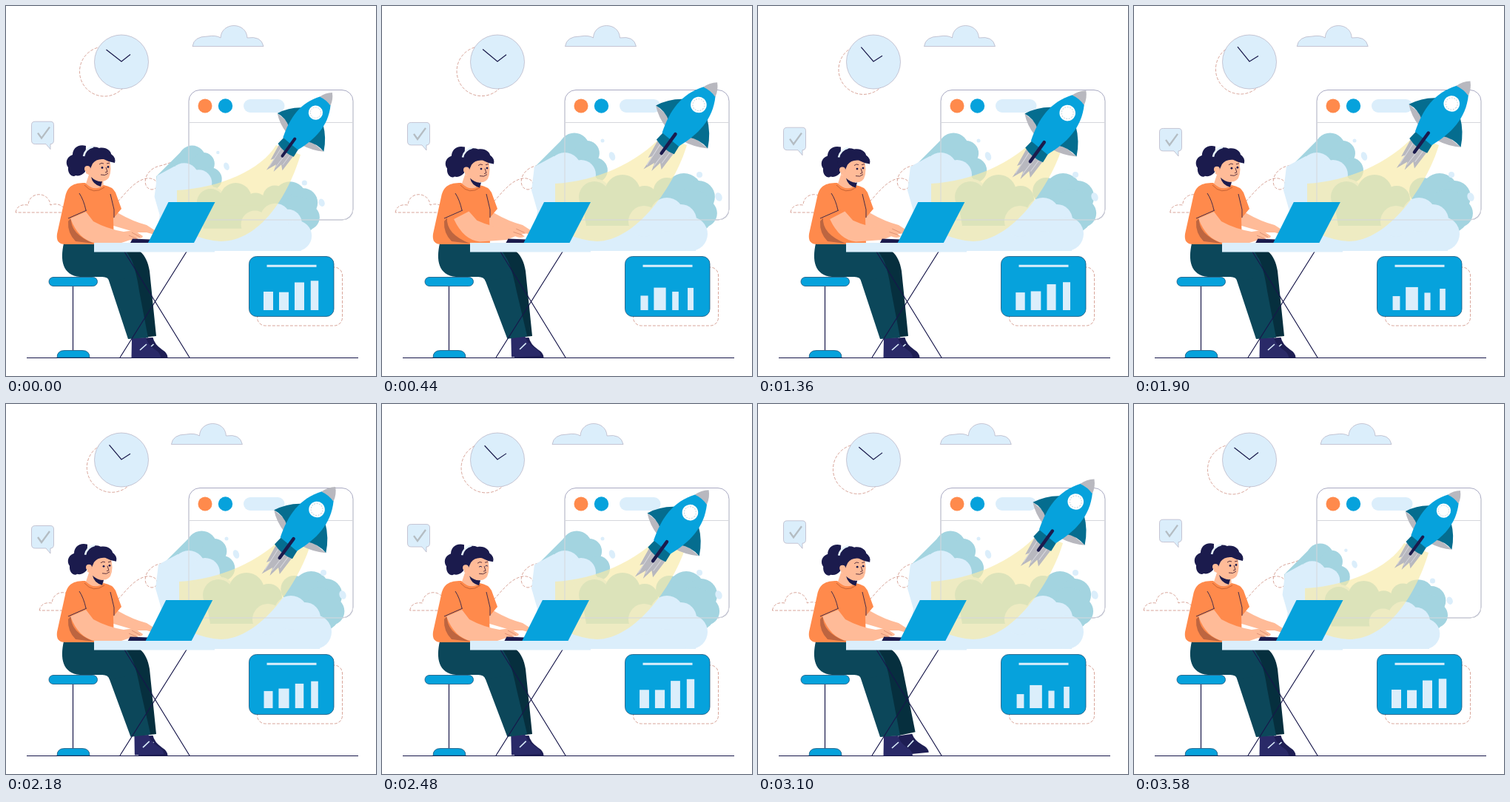
These frames come from a looping animation (500x500 px, 3600 ms). An HTML page:

```html
<!DOCTYPE html>
<html lang="en">
<head>
<meta charset="utf-8">
<title>Rocket launch at the desk</title>
<style>
html, body { margin: 0; width: 100%; height: 100%; overflow: hidden; background: #fff; }
svg { display: block; width: 500px; height: 500px; }
.dash { fill: none; stroke: #cf8f80; stroke-width: .8; stroke-dasharray: 4 2; }
.line { fill: none; stroke: #17174a; stroke-width: 1.2; }
.edge { stroke: #a9a3b8; stroke-width: .6; }
.light { fill: #dbeefb; }
.teal { fill: #a3d4e0; }
.blue { fill: #06a2dc; }
.navy { fill: #1b1b4d; }
.skin { fill: #ffbb98; }
.shirt { fill: #ff8a4c; }
.pants { fill: #0c475a; }
.shade { fill: #062f3e; }
.gray { fill: #b8b8bf; }
</style>
</head>
<body>
<svg viewBox="0 0 500 500">
  <defs>
    <g id="shoe">
      <path d="M170 449L189 448Q191 457 201 464Q209 469 209 475H169.500Z"/>
      <path d="M181 465L190 457" stroke="#dbeefb" stroke-width="1.6"/>
    </g>
  </defs>

  <path id="skyCloud" class="light edge" d="M252 54.5Q254 41 272 41Q284 39 290 43C291 21 325 21 326 43Q345 40 348 54.5Z"/>
  <path id="lineCloud" class="dash" d="M13 279Q15 267 30 269C31 250 58 250 60 269Q75 264 82 279Z"/>
  <circle id="ring" class="dash" r="33.5"/>
  <circle class="light edge" cx="156" cy="75.500" r="36.5"/>
  <path id="hands" class="line"/>
  <g id="bubble">
    <path class="light edge" d="M39.500 155.500H60Q64.500 155.500 64.500 160V181Q64.500 186 60 186V193L54 186H39.500Q34.500 186 34.500 181V160Q34.500 155.500 39.500 155.500Z"/>
    <path d="M43 171L48 178L59 163" fill="none" stroke="#b4bcc2" stroke-width="2.3"/>
  </g>

  <rect x="247" y="113.500" width="222" height="175.500" rx="15" fill="#fff" stroke="#a8a9c2"/>
  <circle class="shirt" cx="269" cy="135" r="9.500"/>
  <circle class="blue" cx="296.500" cy="135" r="9.700"/>
  <rect class="light" x="321" y="126" width="55.500" height="18" rx="9"/>
  <path class="dash" d="M143 273C160 256 172 236 190 233C207 231 208 248 197 248C183 247 185 221 208 216C225 212 232 206 245 204"/>

  <g id="smoke">
    <g id="drift" class="teal">
      <path d="M248 175L205 218L206 252L290 252V192Z"/>
      <circle cx="259" cy="192" r="20.500"/>
      <circle cx="276" cy="199" r="17"/>
      <circle cx="287" cy="222" r="17"/>
      <circle cx="384" cy="250" r="18"/>
      <circle cx="407" cy="251" r="25"/>
      <circle cx="427" cy="258" r="22"/>
      <circle cx="433" cy="280" r="19"/>
      <circle cx="418" cy="278" r="30"/>
    </g>
    <g class="light">
      <path d="M232 203L206 217L202 249L210 277L200 331H424V290L372 285L310 255L270 210Z"/>
      <circle cx="247" cy="220" r="22"/>
      <circle cx="269" cy="228" r="20"/>
      <circle cx="290" cy="252" r="18"/>
    </g>
    <g class="teal">
      <circle cx="287" cy="258" r="21"/>
      <circle cx="325" cy="252" r="24"/>
      <circle cx="355" cy="261" r="18"/>
      <path d="M270 262H372L345 297H276Z"/>
    </g>
    <g class="light">
      <circle cx="354" cy="291" r="21"/>
      <circle cx="385" cy="282" r="23"/>
      <circle cx="404" cy="289" r="21"/>
      <circle cx="417" cy="308" r="23"/>
      <circle cx="298" cy="182" r="2.500"/>
      <ellipse cx="311" cy="203" rx="4" ry="6" transform="rotate(-20 311 203)"/>
      <circle cx="429" cy="228" r="4"/>
      <ellipse cx="455" cy="258" rx="4.500" ry="6" transform="rotate(-20 455 258)"/>
    </g>
  </g>
  <path id="flame" fill="#f8eaa8" fill-opacity=".68"/>
  <path d="M247 157.500H469M247 128V274Q247 289 262 289H454Q469 289 469 274V128" fill="none" stroke="#d5d7dc"/>

  <g id="rocket">
    <path class="gray" d="M-12 110L-7 137L-4 132L-2 153L4 137L8 148L10 132L17 138L16 110Z"/>
    <path d="M-6 113L-2 146M5 113L6 141M11 113L12 131" stroke="#d8d8de" fill="none"/>
    <path class="gray" d="M-44 76Q-32 86 -14 90V76ZM47 76Q33 86 14 90V76Z"/>
    <path d="M-20 45Q-36 57 -44 76Q-30 73 -17 81ZM20 45Q37 57 47 76Q31 73 17 81Z" fill="#056d8f"/>
    <path d="M-13 97H15L17 111Q2 116 -14 111Z" fill="#056d8f"/>
    <path class="blue" d="M-10 15Q0 12 10 15C28 42 25 70 15 99H-14C-25 70 -28 42 -10 15Z"/>
    <path class="gray" d="M0 -1Q8 6 10.500 16Q0 13 -10.500 16Q-8 6 0 -1Z"/>
    <circle cx="0" cy="38.500" r="10.800" fill="#fff"/>
    <circle cx="0" cy="38.500" r="8" fill="none" stroke="#c9d4dc" stroke-dasharray="2 1.500"/>
    <path d="M1 89L3 121" stroke="#1b1b4d" stroke-width="4.500" stroke-linecap="round"/>
  </g>

  <rect class="dash" x="339.500" y="353" width="115" height="79" rx="11"/>
  <rect class="blue" x="328.500" y="338.500" width="114.500" height="81" rx="10" stroke="#17537c" stroke-width=".8"/>
  <path d="M352.500 351.300H419.500" stroke="#dbeefb" stroke-width="3"/>
  <g id="bars" class="light"></g>

  <path class="line" d="M28 475.500H476"/>
  <path class="line" d="M90.500 379V465"/>
  <rect class="blue" x="58" y="366.500" width="65.500" height="12" rx="6" stroke="#17537c" stroke-width=".8"/>
  <path class="blue" d="M69 475Q69 465.500 79 465.500H103Q113 465.500 113 475Z" stroke="#17537c" stroke-width=".8"/>

  <path class="navy" d="M138 364L150 364L148 376Z"/>
  <g id="backLeg">
    <use href="#shoe" x="9.500" fill="#1e1e54"/>
    <path class="shade" d="M145 323C176 321 190 333 194 358L203 446L177 449L155 360Z"/>
  </g>
  <g id="frontLeg">
    <use href="#shoe" fill="#2a2a68"/>
    <path class="pants" d="M137 365L140 340L168 340Q175 352 180 385L192 448L165 450Z"/>
  </g>
  <path class="pants" d="M78 321H148C162 325 170 340 176 366L140 372Q138 366 130 366H100C76 364 73 343 78 321Z"/>
  <path class="line" d="M160 332L248 475M244 332L154 475"/>

  <path class="skin" d="M142 270L152 280Q171 291 190 296L207 307Q208 311 201 309L190 306L176 306L142 296Z"/>
  <path class="skin" d="M112 228L131 232L132 246Q120 254 107 243Z"/>
  <path class="shirt" d="M107 239C91 239 83 243 80 258L69 308Q67 322 80 322H146L145 287L156 274L148 252Q144 244 132 242Q120 252 107 239Z"/>
  <path d="M88 286Q86 308 119 321L94 318Q83 307 84 291Z" fill="#bd6540"/>
  <path class="line" d="M84 287L109 276M99 253Q105 262 108 276M146 286V275L141 254" style="stroke-width:.8"/>
  <path d="M106 242Q118 256 133 245" fill="none" stroke="#b9582e" stroke-width=".8"/>
  <g id="frontArm">
    <path class="skin" d="M87 287L108 278L118 291Q136 301 159 305L173 303L185 311Q184 315 176 313L181 317Q176 320 168 316L156 320H120Q98 316 87 287Z"/>
    <path d="M166 310L178 315M170 306L181 312" stroke="#c9785e" stroke-width=".6"/>
  </g>
  <g id="head">
    <path class="navy" d="M108 189C97 186 90 193 90 201C81 204 80 213 84 218C83 228 91 232 94 229Q101 231 107 224Z"/>
    <path class="skin" d="M108 208L139 205Q144 221 139 232Q132 241 121 233L108 226Z"/>
    <path class="navy" d="M115 231Q122 238 130 237L128 244Q117 241 115 231Z"/>
    <path class="navy" d="M104 212C102 195 115 187 126 192C135 190 142 196 142 200Q149 205 147 212Q139 211 132 207Q122 206 117 213L113 222Q105 226 104 212Z"/>
    <path d="M105 203Q107 193 118 190" fill="none" stroke="#e6f3fb" stroke-width="2.600"/>
    <circle class="skin" cx="110" cy="220" r="4"/>
    <path d="M126 214Q129 211 132 213M136 213L140 212M128 228Q134 230 138 226M135 218L137 224L134 225" fill="none" stroke="#4a2637" stroke-width=".9"/>
    <g id="eyes" class="navy"><circle cx="130" cy="218.500" r="1.400"/><circle cx="138" cy="217.500" r="1.400"/></g>
    <path id="lids" class="line" d="M128 219Q130 217 132 219M136.500 218Q138 216 140 218" style="stroke-width:.9"/>
  </g>

  <rect class="light" x="119" y="320" width="163" height="12.500"/>
  <g id="laptop">
    <path class="navy" d="M171 314.500L196 315.500V320H168Z"/>
    <path class="blue" d="M219.500 265H282.500L254 320H192Z"/>
  </g>
</svg>
<script>
const LOOP = 3600;
const el = id => document.getElementById(id);
const move = (id, value) => el(id).setAttribute('transform', value);
const shift = (id, x, y = 0) => move(id, `translate(${x} ${y})`);
const wave = (t, period) => (1 - Math.cos(2 * Math.PI * t / period)) / 2;
const mix = (a, b, k) => a + (b - a) * k;

// Value at time t on [time, value] keys with sine easing
function ease(t, keys) {
  const i = Math.max(1, keys.findIndex(k => k[0] >= t));
  const [t0, a] = keys[i - 1], [t1, b] = keys[i];
  return mix(a, b, wave(t - t0, 2 * (t1 - t0)));
}
const pulse = (t, from, to) => t > from && t < to ? wave(t - from, to - from) : 0;

// Centre, width, height, scale at the other end of the beat
const bars = [[354.5, 13, 25, .74], [375.5, 13, 24.3, 1.3], [396.5, 13, 37.5, .6], [417, 10.5, 39.7, .71]];
el('bars').innerHTML = bars.map(([, w, h]) => `<rect x="${-w / 2}" y="${-h}" width="${w}" height="${h}"/>`).join('');

function draw(t) {
  const slow = wave(t, LOOP), beat = wave(t, 1200);
  const grow = ease(t, [[0, 0], [400, 1], [3200, 1], [LOOP, 0]]);
  const size = mix(.893, 1, grow);

  shift('skyCloud', -32 * slow);
  shift('lineCloud', 36 * slow);
  shift('ring', 133 + 11 * slow, 88.5 - 3 * slow);
  shift('bubble', 0, .6 + 9.4 * slow);
  shift('laptop', -3.7 * slow);
  shift('drift', 6 * slow);
  el('hands').setAttribute('d', `M${135.5 + 4.5 * slow} ${59 - 4 * slow}L156 75L168 ${65.5 + 2 * slow}`);

  move('smoke', `translate(189 331) scale(${size}) translate(-189 -331)`);
  move('rocket', `translate(${440.3 + 14.5 * beat} ${117.7 - 16.5 * beat}) rotate(39.6) scale(${size})`);
  const left = mix(231, 234, grow), top = mix(249, 240, grow);
  const tipX = mix(398, 412, grow), tipY = mix(201, 188, grow);
  el('flame').setAttribute('d', `M${left} ${top}C290 ${top - 3} 345 ${top - 28} ${tipX - 33} ${tipY - 13}L${tipX} ${tipY}` +
    `C${tipX - 16} ${tipY + 54} 344 318 290 318Q270 317 250 308L${left} 290Z`);

  bars.forEach(([x, , , end], i) =>
    el('bars').children[i].setAttribute('transform', `translate(${x} 411) scale(${mix(1, end, beat)})`));

  const front = pulse(t, 100, 1020) + pulse(t, 1900, 2820);
  const back = pulse(t, 1000, 1340) + pulse(t, 2800, 3400);
  move('frontLeg', `rotate(${-3 * front} 160 350)`);
  move('backLeg', `rotate(${-5.5 * back} 180 345)`);

  const nod = ease(t, [[0, 0], [440, 4], [1360, 4], [2000, 1.8], [3000, 4.5], [LOOP, 0]]);
  shift('head', nod, nod * .4);
  const arm = ease(t, [[0, 0], [440, 1], [1360, 1], [1900, 0], [LOOP, 0]]);
  move('frontArm', `translate(${11 * arm} 0) rotate(${-4 * arm} 100 300)`);
  const blink = t > 2400 && t < 2560;
  el('eyes').style.display = blink ? 'none' : '';
  el('lids').style.display = blink ? '' : 'none';
}

function frame() {
  draw(performance.now() % LOOP);
  requestAnimationFrame(frame);
}
frame();
</script>
</body>
</html>
```
